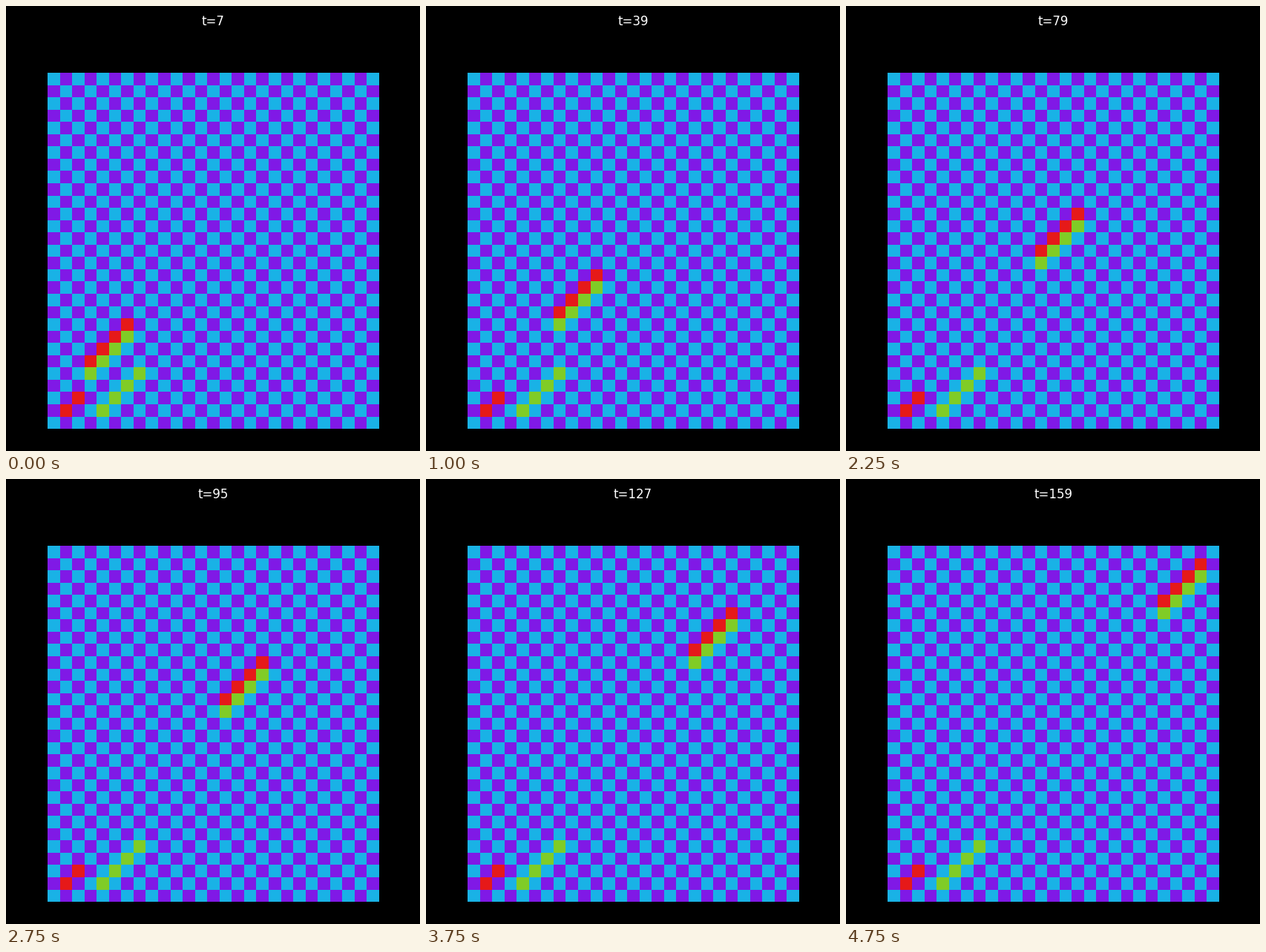
These frames come from a looping animation (558x600 px, 5 s). A matplotlib script:

```python
import numpy as np
import matplotlib.pyplot as plt
from matplotlib.animation import FuncAnimation

WIDTH, HEIGHT, DPI = 558, 600, 100
COLS, ROWS = 27, 29
GRID_W, GRID_H = 447, 480
LEFT, BOTTOM = 56, 30
FRAMES, INTERVAL = 20, 250

CYAN, PURPLE, RED, GREEN = range(4)
PALETTE = np.array([
    [25, 178, 230],
    [128, 25, 230],
    [230, 25, 25],
    [128, 204, 38],
], dtype=np.uint8)


def cell_index(length, count):
    """Map each pixel along an axis to the cell that covers it."""
    edges = np.floor(np.arange(1, count) * GRID_W / COLS + 0.5)
    return np.searchsorted(edges, np.arange(length), side="right")


PIXEL_COL = cell_index(GRID_W, COLS)
PIXEL_ROW = cell_index(GRID_H, ROWS)


def diagonal(grid, col, row, length, color):
    """Paint cells going up and to the right from (col, row)."""
    for k in range(length):
        grid[row - k, col + k] = color


def board(step):
    rows, cols = np.indices((ROWS, COLS))
    grid = (rows + cols) % 2
    diagonal(grid, 1, 27, 2, RED)
    diagonal(grid, 4, 27, 4, GREEN)
    # the travelling pair of diagonals
    diagonal(grid, 3 + step, 23 - step, 4, RED)
    diagonal(grid, 3 + step, 24 - step, 4, GREEN)
    return grid


def render(step):
    return PALETTE[board(step)[np.ix_(PIXEL_ROW, PIXEL_COL)]]


plt.rcParams["font.family"] = "DejaVu Sans"
fig = plt.figure(figsize=(WIDTH / DPI, HEIGHT / DPI), dpi=DPI, facecolor="black")
image = fig.figimage(render(0), xo=LEFT, yo=BOTTOM, origin="upper")
title = fig.suptitle("t=7", color="white", fontsize=12)


def update(step):
    image.set_data(render(step))
    title.set_text(f"t={7 + 8 * step}")
    return image, title


anim = FuncAnimation(fig, update, frames=FRAMES, interval=INTERVAL,
                     repeat=True, repeat_delay=0, blit=False)
plt.show()
```
